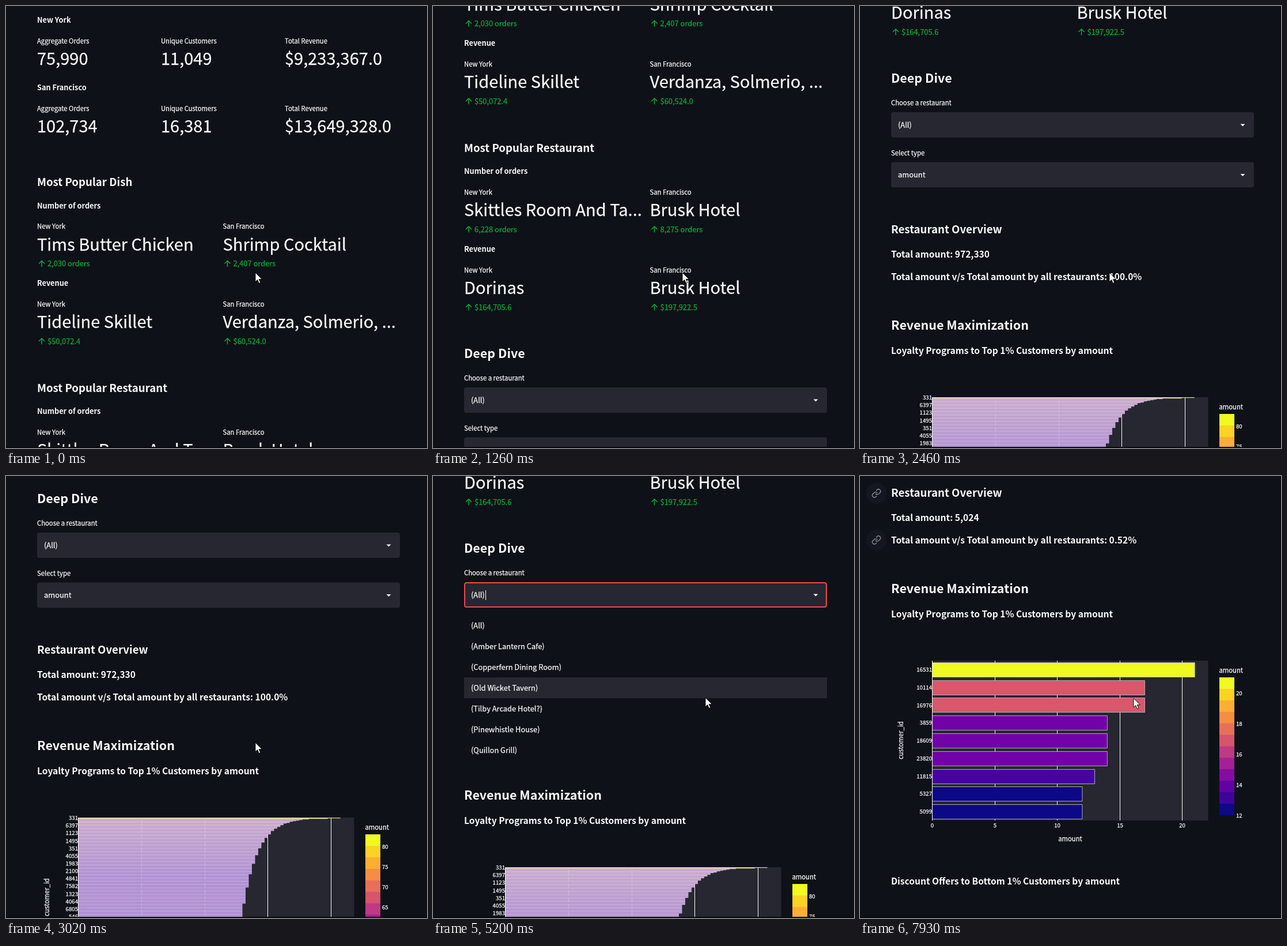
These frames come from a looping animation (731 by 766 pixels, 8 s). An HTML page:

```html
<!DOCTYPE html>
<html lang="en">
<head>
<meta charset="utf-8">
<title>Orders dashboard</title>
<style>
html, body { margin: 0; width: 100%; height: 100%; overflow: hidden; background: #0e1117; }
svg { display: block; width: 731px; height: 766px; }
text { font-family: "Noto Sans CJK SC", "Noto Sans CJK JP", "Noto Sans", sans-serif; fill: #fafafa; stroke: #fafafa; stroke-width: .25; white-space: pre; }
.b { font-weight: 700; stroke-width: 0; }
.g { fill: #09ab3b; stroke: #09ab3b; }
.arrow { fill: none; stroke: #09ab3b; stroke-width: 1.5; }
.link path { fill: none; stroke: #8f9099; stroke-width: 1.9; stroke-linecap: round; stroke-linejoin: round; }
</style>
</head>
<body>
<svg id="stage" viewBox="0 0 731 766"></svg>
<script>
const LOOP = 8000, STEP = 136.5;   // the screen refreshes once per STEP ms
const PLASMA = ['0d0887', '46039f', '7201a8', '9c179e', 'bd3786', 'd8576b', 'ed7953', 'fb9f3a', 'fdca26', 'f0f921']
  .map(h => [0, 2, 4].map(i => parseInt(h.slice(i, i + 2), 16)));

const clamp = (v, lo, hi) => Math.max(lo, Math.min(hi, v));
const mix = (a, b, k) => a.map((v, i) => Math.round(v + (b[i] - v) * k));
const rgb = c => `rgb(${c})`;
function plasma(k) {
  const p = clamp(k, 0, 1) * 9, i = Math.min(8, Math.floor(p));
  return mix(PLASMA[i], PLASMA[i + 1], p - i);
}
const range = (n, fn) => Array.from({ length: n }, (_, i) => fn(i)).join('');

// y is the middle of the capitals; baselines sit on whole pixels
function text(x, y, str, size, cls = '', attrs = '') {
  const fs = size * (cls === 'b' ? 0.885 : 0.895);
  return `<text x="${x}" y="${Math.round(y + size * 0.33)}" font-size="${fs.toFixed(2)}" class="${cls}" ${attrs}>${str}</text>`;
}
const rect = (x, y, w, h, fill, attrs = '') =>
  `<rect x="${x}" y="${y}" width="${w}" height="${h}" fill="${fill}" ${attrs}/>`;
const centred = 'text-anchor="middle"';

const H1 = 24.3, H2 = 21.1, H3 = 17.6;
const bold = (y, str, size = 14.4) => text(54, y, str, size, 'b');
const metric = (x, y, label, value) => text(x, y, label, 12.6) + text(x, y + 31, value, 32.4);
const delta = (x, y, str) =>
  `<path class="arrow" d="M${x + 8} ${y + 5.5}v-10.5m-5 5l5-5l5 5"/>` + text(x + 18, y, str, 14.4, 'g');

function totals(y, city, values) {
  const labels = ['Aggregate Orders', 'Unique Customers', 'Total Revenue'];
  return bold(y, city) + values.map((v, i) => metric(54 + 215 * i, y + 36.3, labels[i], v)).join('');
}
function versus(y, title, ...sides) {
  return bold(y, title) + sides.map(([name, note], i) => {
    const x = 54 + 322.5 * i;
    return metric(x, y + 36.3, ['New York', 'San Francisco'][i], name) + delta(x, y + 100.5, note);
  }).join('');
}
const select = (y, label, value) =>
  text(54, y - 16, label, 12.6) + rect(54, y, 630, 44, '#262730', 'rx="4"') + value +
  `<path d="M660.5 ${y + 20.5}h8l-4 4z" fill="#fafafa"/>`;
const link = y =>
  `<g class="link" data-y="${y}"><circle cx="28.5" cy="${y}" r="18" fill="#14171f"/>
   <g transform="translate(20 ${y - 8.5}) scale(.71)">
   <path d="M10 13a5 5 0 0 0 7.54.54l3-3a5 5 0 0 0-7.07-7.07l-1.72 1.71"/>
   <path d="M14 11a5 5 0 0 0-7.54-.54l-3 3a5 5 0 0 0 7.07 7.07l1.71-1.71"/></g></g>`;

// Bar charts share one plot area
const LEFT = 125, TOP = 1571, TALL = 277, BOTTOM = TOP + TALL;
function frame(step, unit, bars) {
  const grid = range(5, i => {
    const x = Math.round(LEFT + i * step * unit);
    return rect(x, TOP, 1, TALL, '#fff') + text(x + 0.5, BOTTOM + 8, i * step, 10.8, '', centred);
  });
  return rect(LEFT, TOP, 479.5, TALL, '#262730') + grid + bars + rect(LEFT, TOP, 1, TALL, '#fff') +
    text(365, BOTTOM + 32, 'amount', 12.6, '', centred) +
    text(71, 1709, 'customer_id', 12.6, '', centred + ' transform="rotate(-90 71 1709)"');
}
const rowLabel = (y, id) => text(LEFT, y, id, 10.8, '', 'text-anchor="end"');
function colorBar(first, step, gap, pitch) {
  const top = 1600, tall = 239, band = tall / 12;
  const bands = range(12, i => rect(624, top + i * band, 26, band + (i < 11 ? 0.5 : 0), rgb(plasma(1 - i / 11))));
  const ticks = range(Math.ceil((tall + 1 - gap) / pitch), i => text(653, top + gap + i * pitch, first - i * step, 10.8));
  return text(623.5, 1588, 'amount', 12.6) + bands + ticks;
}
function allCustomers() {
  const unit = 5.49, ids = [331, 6397, 1123, 1495, 351, 4055, 1983];
  const bars = range(TALL, d => {
    const v = d < 2 ? 83 - 4 * d : Math.round(76.5 - 4.8 * Math.log(d));
    const base = mix([207, 178, 207], [178, 148, 214], Math.min(1, d / 100));
    const shade = Math.sin(d * 1.1) * 0.5 + Math.sin(d * 2.3) * 0.3;
    const tint = mix(base, shade > 0 ? [222, 198, 224] : [166, 132, 200], Math.abs(shade) * 0.45);
    return rect(LEFT, TOP + d, v * unit, 1.2, d < 2 ? '#e2d8a0' : rgb(tint));
  });
  const dashes = range(2, i => `<path d="M${Math.round(LEFT + (i + 1) * 20 * unit) + 0.5} ${TOP + 4}V${BOTTOM}" stroke="#fff" stroke-opacity=".22" stroke-dasharray="9 3"/>`);
  const labels = range(21, i => rowLabel(TOP + 0.5 + i * 13.15, ids[i] || (i * 2741 + 913) % 9000));
  return frame(20, unit, bars + dashes + labels) + colorBar(80, 5, 21.5, 35);
}
function oneRestaurant() {
  const unit = 21.7, pitch = TALL / 9;
  const rows = { 21: [16531], 17: [10114, 16976], 14: [3859, 18609, 23820], 13: [11815], 12: [5327, 5099] };
  const sorted = Object.keys(rows).reverse().flatMap(v => rows[v].map(id => [id, v]));
  const bars = sorted.map(([id, v], i) => {
    const y = TOP + (i + 0.5) * pitch;
    return rect(LEFT + 0.5, Math.round(y - 12.5) + 0.5, v * unit, 25, rgb(PLASMA[v - 12]), 'stroke="#b9b6c6" stroke-width=".9"') + rowLabel(y, id);
  }).join('');
  return frame(5, unit, bars) + colorBar(20, 2, 27, 53);
}

const options = ['(All)', '(Amber Lantern Cafe)', '(Copperfern Dining Room)', '(Old Wicket Tavern)', '(Tilby Arcade Hotel?}', '(Pinewhistle House)', '(Quillon Grill)'];
const ROW = 36, LIST = 1134;
const list = `<g id="list">` + rect(54, LIST - 7, 630, 270, '#0e1117', 'rx="4"') +
  rect(54, LIST, 630, ROW, '#262730', 'id="hover"') +
  options.map((o, i) => text(66, LIST + ROW * (i + 0.5), o, 14.4)).join('') + `</g>`;

const overview = (total, share) => bold(1323, 'Total amount: ' + total, H3) +
  bold(1362, `Total amount v/s Total amount by all restaurants: ${share}%`, H3);

document.getElementById('stage').innerHTML = rect(0, 0, 731, 766, '#0e1117') +
  `<g id="page"><g id="body">` +
  totals(24.5, 'New York', ['75,990', '11,049', '$9,233,367.0']) +
  totals(141.3, 'San Francisco', ['102,734', '16,381', '$13,649,328.0']) +
  bold(305, 'Most Popular Dish', H2) +
  versus(346, 'Number of orders', ['Tims Butter Chicken', '2,030 orders'], ['Shrimp Cocktail', '2,407 orders']) +
  versus(480.5, 'Revenue', ['Tideline Skillet', '$50,072.4'], ['Verdanza, Solmerio, ...', '$60,524.0']) +
  bold(662, 'Most Popular Restaurant', H2) +
  versus(702.5, 'Number of orders', ['Skittles Room And Ta...', '6,228 orders'], ['Brusk Hotel', '8,275 orders']) +
  versus(837.5, 'Revenue', ['Dorinas', '$164,705.6'], ['Brusk Hotel', '$197,922.5']) +
  bold(1018, 'Deep Dive', H1) +
  select(1077, 'Choose a restaurant', text(66, 1099.5, options[0], 14.4, '', 'id="choice"')) +
  `<g id="focus"><rect x="55" y="1078" width="628" height="42" rx="3.5" fill="none" stroke="#f04a4e" stroke-width="2"/>
   <path id="caret" d="M0 1091v17" stroke="#fafafa"/></g>` +
  select(1163.5, 'Select type', text(66, 1185.5, 'amount', 14.4)) +
  bold(1280, 'Restaurant Overview', H2) +
  bold(1446, 'Revenue Maximization', H1) +
  bold(1490, 'Loyalty Programs to Top 1% Customers by amount', H3) +
  `<g id="before">${overview('972,330', '100.0')}${allCustomers()}</g>` +
  `<g id="after">${overview('5,024', '0.52')}${oneRestaurant()}</g>` +
  bold(1953, 'Discount Offers to Bottom 1% Customers by amount', H3) +
  `</g>` + link(1281) + link(1362) + list + `</g>` +
  rect(0, 764, 731, 2, '#07090d') + rect(730, 0, 1, 766, '#090b10') +
  `<path id="cursor" d="M0 0v16l3.7-3.5 2.6 6 2.5-1.1-2.6-5.8h5.2z" fill="#fff" stroke="#000" stroke-width=".9"/>`;

// Key points as [refresh, value...]; the motion between them is linear
const SCROLL = [[0, 0], [5, 221], [10, 465], [11, 465], [13, 572], [18, 893], [20, 893], [22.5, 1000], [25, 893], [51, 893], [56, 1243], [58, 1251]];
const POINTER = [[26, 433, 462], [32, 473, 200], [33, 473, 200], [38, 473, 384], [56, 473, 384], [58, 475, 385]];
const OPEN = 32, PICK = 39, FADE = 42, DONE = 52;

function along(keys, n) {
  const i = keys.findIndex(k => k[0] > n);
  if (i < 0) return keys[keys.length - 1].slice(1);
  if (i === 0) return keys[0].slice(1);
  const a = keys[i - 1], b = keys[i], k = (n - a[0]) / (b[0] - a[0]);
  return mix(a.slice(1), b.slice(1), k);
}
const $ = Object.fromEntries([...document.querySelectorAll('[id]')].map(e => [e.id, e]));
const links = document.querySelectorAll('.link');
const show = (el, on) => { el.style.display = on ? '' : 'none'; };
const move = (el, x, y) => el.setAttribute('transform', `translate(${x} ${y})`);

function draw(t) {
  const n = Math.floor((t + 5) / STEP);
  const [x, y] = along(POINTER, n), [scroll] = along(SCROLL, n);
  move($.page, 0, -scroll);
  move($.cursor, x, y);
  $.body.setAttribute('opacity', n < DONE ? 1 - 0.015 * Math.max(0, n - FADE) : 1);

  $.choice.textContent = options[n < PICK ? 0 : 4];
  show($.focus, n >= OPEN);
  move($.caret, Math.round(67 + $.choice.getComputedTextLength()) + 0.5, 0);

  show($.list, n >= OPEN && n < PICK);
  $.hover.setAttribute('y', LIST + ROW * clamp(Math.floor((y + scroll - LIST) / ROW), 0, 6));

  show($.before, n < DONE);
  show($.after, n >= DONE);
  const roaming = n > 26 && n < OPEN;
  links.forEach(l => show(l, n >= DONE || (roaming && Math.abs(y + scroll - l.dataset.y) < 18)));
}

const start = performance.now();
function tick() {
  draw((performance.now() - start) % LOOP);
  requestAnimationFrame(tick);
}
draw(0);
requestAnimationFrame(tick);
</script>
</body>
</html>
```
